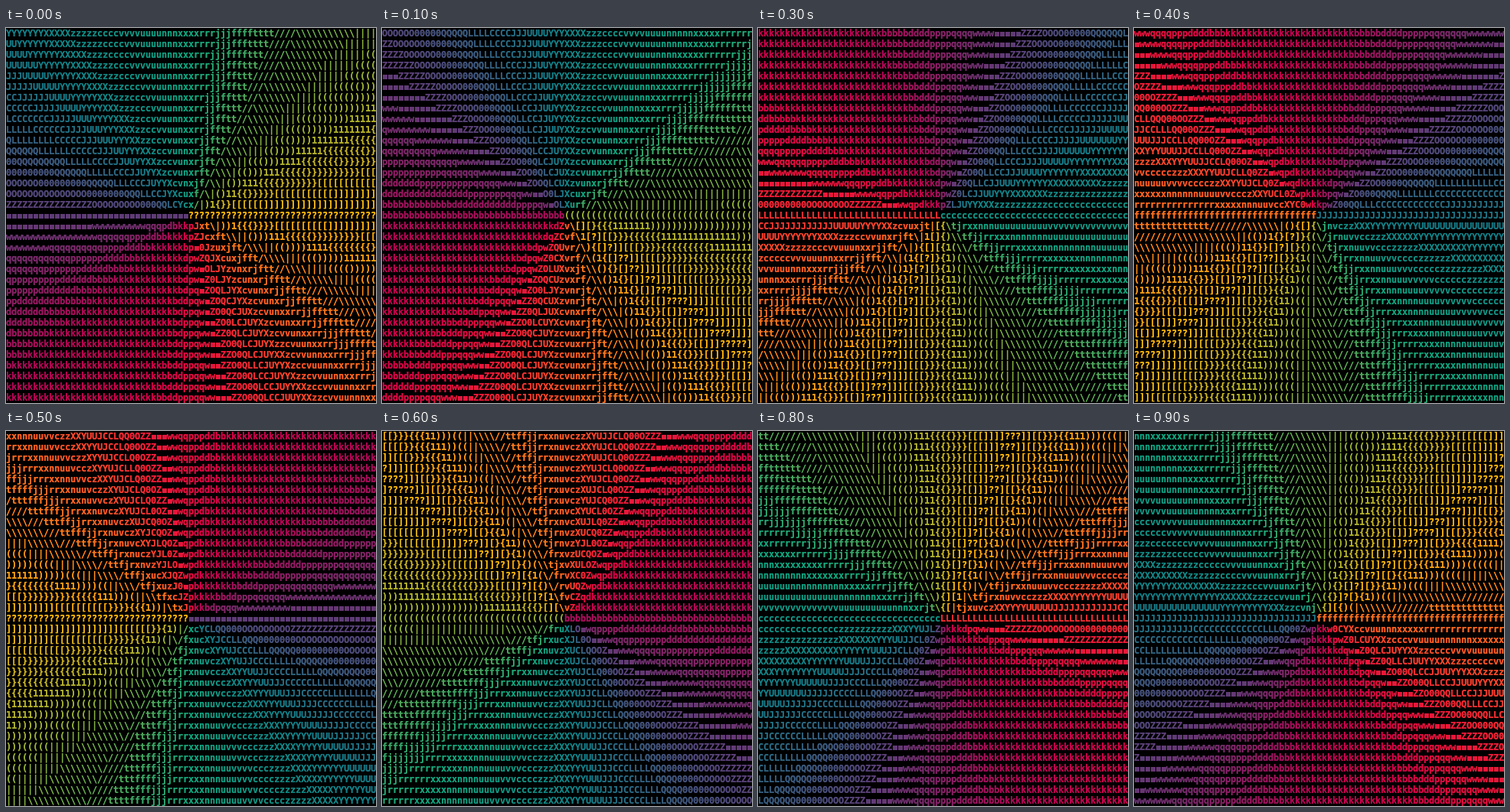
Recreate the animation shown at these times as an HTML page with a canvas. Size 483 px wide and 490 px high, loop 1 s.

```html
<!DOCTYPE html>
<html lang="en">
<head>
<meta charset="utf-8">
<title>Spinning character wheel</title>
<style>
  html, body { margin: 0; width: 100%; height: 100%; overflow: hidden; background: #000; }
  canvas { display: block; width: 483px; height: 490px; }
</style>
</head>
<body>
<canvas id="stage" width="483" height="490"></canvas>
<script>
const COLS = 69, ROWS = 35, CELL_W = 7, CELL_H = 14;
const MID_COL = 34, MID_ROW = 17;
const STEPS = 10, STEP_MS = 100;

// Dark to light: the used part of a 71-level ramp, which starts at level 13
const RAMP = 'kbdpqwmZO0QLCJUYXzcvunxrjft/\\\\|()1{}[]?';
const RAMP_LEVELS = 71, RAMP_START = 13;

// Key colours by angle, in degrees clockwise from the right
const WHEEL = [
  [0, 'ffb60a'], [45, 'ff6520'], [75, 'ef1c36'], [102, 'd00048'], [135, 'b00654'],
  [180, '5e3c76'], [225, '127a84'], [270, '10a27c'], [315, '86ad3c'], [360, 'ffb60a']
].map(([deg, hex]) => ({ deg, rgb: hex.match(/../g).map(h => parseInt(h, 16)) }));

const ctx = document.getElementById('stage').getContext('2d');
const degrees = rad => rad * 180 / Math.PI;

function wheelColor(deg) {
  const i = Math.max(1, WHEEL.findIndex(stop => stop.deg >= deg));
  const a = WHEEL[i - 1], b = WHEEL[i];
  const k = (deg - a.deg) / (b.deg - a.deg);
  return a.rgb.map((v, n) => v + (b.rgb[n] - v) * k);
}

// The brightness of a colour picks its character
function glyph([r, g, b]) {
  const luma = (0.2126 * r + 0.7152 * g + 0.0722 * b) / 255;
  const level = Math.floor(luma * RAMP_LEVELS) - RAMP_START;
  return RAMP[Math.max(0, Math.min(RAMP.length - 1, level))];
}

// The wheel's pointer runs at even speed along the sides of a square
function wheelTurn(step) {
  const side = step * 4 / STEPS;
  const nearest = Math.round(side);
  return nearest * 90 + degrees(Math.atan(2 * (side - nearest)));
}

function drawCell(col, row, turn) {
  const dx = (col - MID_COL) * CELL_W, dy = (row - MID_ROW) * CELL_H;
  const deg = (degrees(Math.atan2(dy, dx)) - turn + 720) % 360;
  const rgb = wheelColor(deg);
  const ch = glyph(rgb);
  const x = col * CELL_W, y = row * CELL_H;
  ctx.fillStyle = `rgb(${rgb.map(Math.round).join(',')})`;
  if (ch === 'm') {
    ctx.fillRect(x + 1, y + 5, 6, 6);   // so heavy that it reads as a block
  } else {
    // Drawn twice for crisp, full-strength strokes
    ctx.fillText(ch, x, y + 11);
    ctx.fillText(ch, x, y + 11);
  }
}

function draw(step) {
  ctx.fillStyle = '#000';
  ctx.fillRect(0, 0, COLS * CELL_W, ROWS * CELL_H);
  ctx.font = 'bold 12px "DejaVu Sans Mono", monospace';
  const turn = wheelTurn(step);
  for (let row = 0; row < ROWS; row++) {
    for (let col = 0; col < COLS; col++) drawCell(col, row, turn);
  }
}

let shown = -1;
const start = performance.now();

function tick() {
  const step = Math.floor((performance.now() - start) / STEP_MS) % STEPS;
  if (step !== shown) {
    draw(step);
    shown = step;
  }
  requestAnimationFrame(tick);
}
tick();
</script>
</body>
</html>
```
